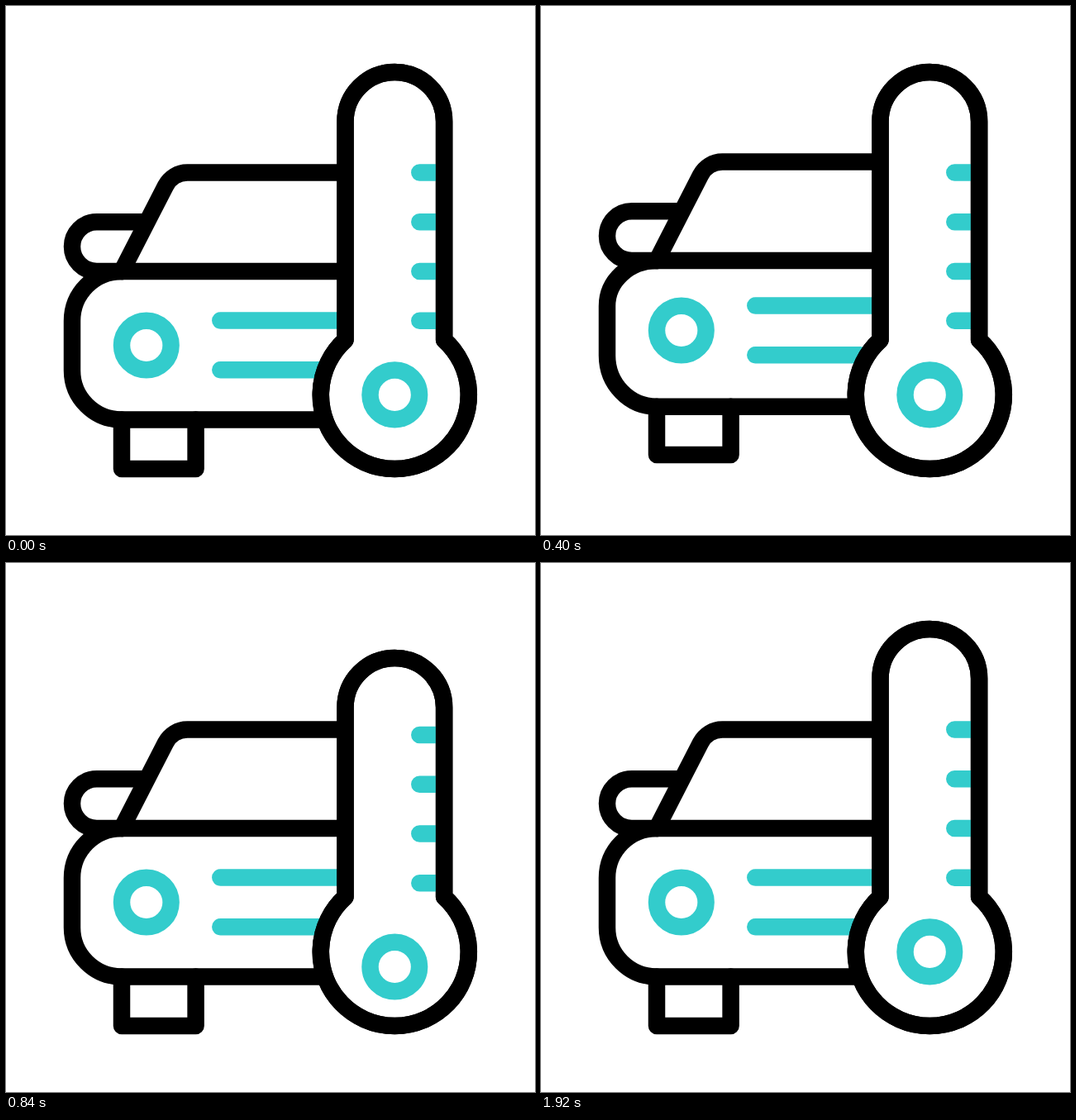
Animation of 640x640 px, one loop 2000 ms. Source, as an HTML page:

```html
<!DOCTYPE html>
<html lang="en">
<head>
<meta charset="utf-8">
<title>Car temperature</title>
<style>
  html, body { margin: 0; width: 100%; height: 100%; overflow: hidden; background: #fff; }
  svg { display: block; width: 100vw; height: 100vh; }
  path, circle { fill: none; stroke: #000; stroke-width: 20.5; stroke-linecap: round; stroke-linejoin: round; }
  .teal { stroke: #3cc; }
  .mark { stroke-width: 23; }
  #glass { fill: #fff; }
</style>
</head>
<body>
<svg viewBox="0 0 640 640">
  <path id="legs"/>
  <path id="body"/>
  <g id="cabin">
    <path d="M165 261.3H109.8a29.8 29.8 0 0 0 0 59.6H140"/>
    <path d="M410 201.5H219.5a29.8 29.8 0 0 0-26.5 16.2L140 321"/>
  </g>
  <g id="front" class="teal">
    <circle class="teal" cx="169.8" cy="410.5" r="29.8"/>
    <path class="teal" d="M259.3 380.5H410M259.3 440.3H386.5"/>
  </g>
  <path id="glass"/>
  <path id="scale" class="teal" d="M500.3 201.5H529M500.3 261.2H529M500.3 321H529M500.3 380.7H529"/>
  <circle id="bulb" class="teal" cx="470.3" cy="470.4" r="29.8"/>
  <path id="wall"/>
  <path id="marks" class="mark"/>
</svg>
<script>
const LOOP = 2000, STEP = 40;
const el = id => document.getElementById(id);
const ease = (t, from, to) => {
  const x = Math.min(1, Math.max(0, (t - from) / (to - from)));
  return x * x * (3 - 2 * x);
};

// Offset that goes rest -> stretched -> squashed -> rest at the four given times
const bounce = (t, [t0, t1, t2, t3]) => (up, down) =>
  up * ease(t, t0, t1) + (down - up) * ease(t, t1, t2) - down * ease(t, t2, t3);

const shift = (id, y) => el(id).setAttribute('transform', `translate(0 ${y})`);
const shape = (id, d) => el(id).setAttribute('d', d);

function drawCar(t) {
  const move = bounce(t, [80, 286, 508, 740]);
  const roof = move(-53, 24);
  const top = 321 + roof;
  const side = 381 + move(-53, 14.3);
  const base = 500.4 + move(-48.2, 14.3);
  const foot = 560 + move(-35.3, 0);
  shift('cabin', roof);
  shift('front', move(-72.2, 32));
  shape('body', `M410 ${top}H139.7A59.7 ${side - top} 0 0 0 80 ${side}v60` +
    `A59.7 ${base - side - 60} 0 0 0 139.7 ${base}H400`);
  shape('legs', `M140 ${base}V${foot}H229.6V${base}`);
}

function drawThermometer(t) {
  const move = bounce(t, [436, 640, 868, 1090]);
  const outline = `M410.5 404V${139.7 + move(-16.5, 37.4)}a59.8 59.8 0 0 1 119.6 0V404` +
    'A89.5 89.5 0 1 1 410.5 404Z';
  const ticks = move(-60, 9.5);
  shape('glass', outline);
  shape('wall', outline);
  shift('scale', ticks);
  shift('bulb', move(-21, 19.8));
  shift('marks', ticks);

  // Black marks sweep leftwards over the ticks, lowest first
  let d = '';
  for (let i = 0; i < 4; i++) {
    const start = 960 + 160 * i;
    const head = ease(t, start, start + 160);
    const tail = ease(t, start + 320, start + 480);
    if (head > tail) d += `M${530 - 29.7 * tail} ${380.7 - 59.75 * i}H${530 - 29.7 * head}`;
  }
  shape('marks', d);
}

function frame() {
  const t = Math.floor(performance.now() % LOOP / STEP) * STEP;
  drawCar(t);
  drawThermometer(t);
  requestAnimationFrame(frame);
}
frame();
</script>
</body>
</html>
```
